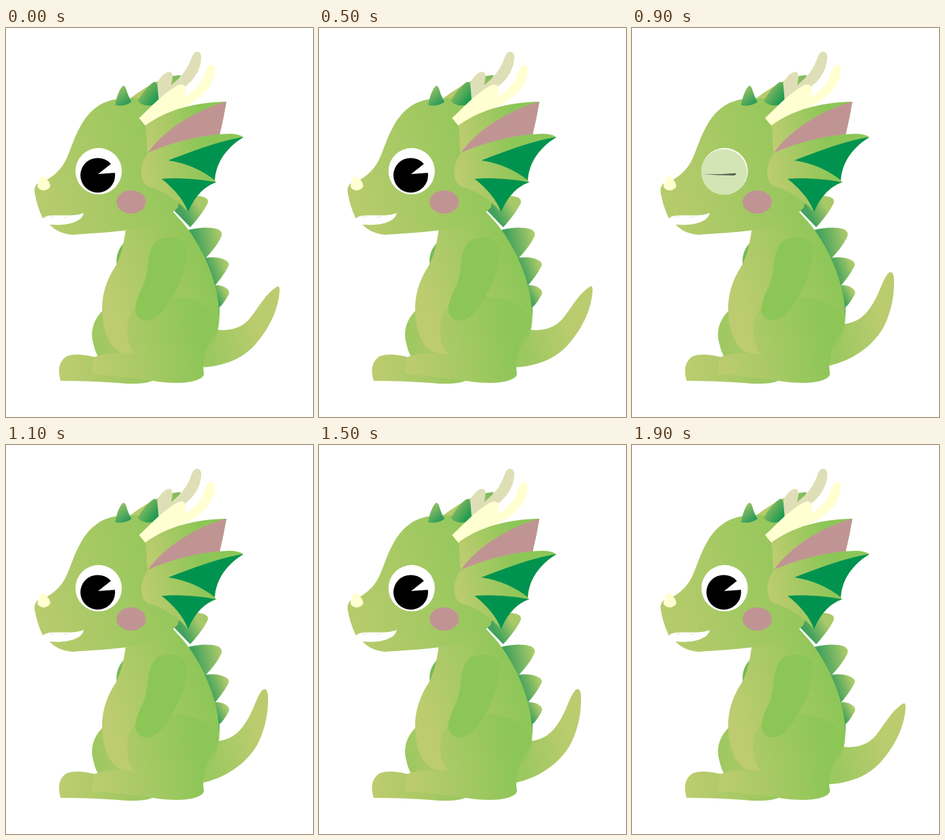
Animation of 450 by 570 pixels, one loop 2100 ms. Source, as an HTML page with a canvas:

```html
<!DOCTYPE html>
<html lang="en">
<head>
<meta charset="utf-8">
<title>Little dragon</title>
<style>
html, body { margin: 0; width: 100%; height: 100%; overflow: hidden; background: #fff; }
canvas { display: block; }
</style>
</head>
<body>
<canvas id="stage" width="450" height="570"></canvas>
<script>
const ctx = document.getElementById('stage').getContext('2d');
const LOOP = 2100;
const LIME = '#bdcc70', GREEN = '#8cc657', DARK = '#00934f';
const PINK = '#c19494', CREAM = '#ffffd2', SHADE = '#dfdfb7';

function blend(x0, y0, x1, y1, from = LIME, to = GREEN) {
  const g = ctx.createLinearGradient(x0, y0, x1, y1);
  g.addColorStop(0, from);
  g.addColorStop(1, to);
  return g;
}

function shape(fill, d) {
  ctx.fillStyle = fill;
  ctx.fill(new Path2D(d));
}

function ellipse(fill, x, y, rx, ry = rx) {
  ctx.fillStyle = fill;
  ctx.beginPath();
  ctx.ellipse(x, y, rx, ry, 0, 0, Math.PI * 2);
  ctx.fill();
}

const tails = {
  low: 'M295 442H308C332 445 349 438 361 421C371 408 381 389 397 379Q401 377 401 384C400 409 388 438 366 463C347 485 318 496 288 497Z',
  mid: 'M295 440H309C328 442 341 435 352 423C365 408 372 384 385 371Q389 369 389 377C387 405 381 429 366 451C350 475 318 492 288 497Z',
  high: 'M295 436L309 434C329 432 340 423 349 410C363 391 367 368 376 359C381 355 384 361 384 368C385 394 379 417 370 436C354 467 321 488 288 495Z'
};

function drawTail(pose) {
  shape(blend(293, 452, 370, 430, '#9cc860', '#bbcc6f'), tails[pose]);
}

function drawBackSpikes() {
  const spike = (x0, y0, x1, y1, d) =>
    shape(blend(x0, y0, x1, y1, '#43a25c', '#a9c969'), d);
  spike(258, 271, 282, 257,
    'M243 264C258 253 272 242 282 246Q300 248 295 258C289 270 279 282 270 292Z');
  spike(276, 309, 313, 301,
    'M267 296C282 292 299 291 311 295Q319 299 315 307C309 319 301 328 292 338Z');
  spike(297, 355, 322, 346,
    'M290 337C304 335 315 336 323 341Q329 345 325 351C319 362 312 371 304 380Z');
  spike(308, 395, 323, 387,
    'M303 377C313 376 320 378 325 383Q329 388 325 393C321 400 317 406 313 409V422H306Z');
}

function drawBody() {
  shape('#75b957', 'M174 314C164 323 160 336 163 351L175 345Z');
  shape(blend(126, 460, 165, 455, '#9dc860', '#a9c966'),
    'M145 411C128 426 123 444 128 462C130 472 133 479 138 486H190V430Z');
  shape(blend(80, 500, 215, 510, LIME, '#98c75d'),
    'M80 517C75 500 78 488 89 481C101 476 120 479 137 484L215 517C202 522 184 522 163 520C136 518 108 517 80 517Z');
  shape(blend(155, 405, 303, 360),
    'M176 292C173 314 169 333 161 348C146 371 140 393 141 416C142 444 151 469 170 476L205 480L297 468Q316 448 312 411C309 366 285 316 259 285L240 264Z');
  shape(blend(128, 495, 290, 466),
    'M126 507C126 497 127 490 130 482C148 475 168 476 190 478C178 467 175 444 180 426C186 406 207 395 237 394C273 391 304 408 311 431C310 443 304 449 296 462C293 476 287 491 290 505C292 514 274 520 250 520Q231 520 215 517Q167 510 126 507Z');
  shape(GREEN,
    'M224 310C245 304 266 307 265 330C264 358 250 387 232 412C218 430 202 434 192 421C185 410 195 391 202 375C211 355 204 323 224 310Z');
}

function drawHead() {
  shape(blend(215, 88, 258, 70, '#b6ca6b', '#75b957'),
    'M178 106C198 91 228 70 256 69L244 105Z');
  shape(SHADE,
    'M222 109C224 98 219 87 223 78C229 68 237 62 242 65C246 69 243 78 242 84C252 75 260 68 266 57C272 47 272 38 278 35C285 33 287 40 286 46C285 62 275 77 261 87L240 108Z');
  shape(blend(52, 225, 232, 178, '#b6cb6c', '#94c75b'),
    'M42 241Q41 232 46 228C57 225 69 218 78 208C92 193 94 172 108 146C121 121 140 106 166 104C193 101 219 103 241 112L267 181L252 263C235 281 202 294 171 297C146 300 120 301 98 303C84 302 72 297 64 288C86 290 111 286 114 271C100 277 76 273 63 275Q57 276 54 279C48 267 44 253 42 241Z');
  ctx.strokeStyle = '#ddddd2';
  ctx.lineWidth = 0.8;
  ctx.stroke(new Path2D('M63 276Q67 279 71 276M84 276Q88 280 92 275'));
  shape(CREAM, 'M46 232Q49 217 54 217Q59 218 60 222Q64 225 65 232Q62 238 54 238Q48 237 46 232Z');
  shape(blend(163, 93, 178, 113, '#8dbd62', '#249859'),
    'M160 113C162 101 166 90 171 85Q174 84 176 89Q179 100 184 108C178 113 169 115 160 113Z');
  shape(blend(200, 90, 224, 107, '#86b960', '#0c954f'),
    'M193 107C199 96 208 84 217 79Q221 78 222 85L224 109C215 115 202 116 193 107Z');
}

function drawFrill() {
  shape(CREAM,
    'M195 132C211 117 230 96 250 85C259 80 264 84 264 92L262 101C274 93 284 85 289 72C292 63 295 54 302 54C307 55 307 66 304 74C298 91 285 102 270 111L205 144Z');
  shape(blend(204, 157, 287, 122),
    'M204 143C237 119 277 109 323 108Q319 132 313 157L208 183C204 169 208 155 204 143Z');
  shape(PINK, 'M323 108C285 118 235 145 208 183C239 169 274 160 313 157Q319 132 323 108Z');
  shape(blend(198, 205, 291, 185),
    'M208 183C245 167 287 156 327 155Q341 155 348 160C325 174 308 195 306 223L308 226C288 233 275 250 267 270C253 253 230 238 211 233C195 228 194 202 208 183Z');
  shape(DARK, 'M348 160C318 164 280 178 238 194Q277 200 306 223C308 195 325 174 348 160Z');
  shape(DARK, 'M228 221C251 219 282 221 308 226C288 233 275 250 267 270C260 251 246 235 228 221Z');
}

function drawFace(closed) {
  ellipse(PINK, 183.5, 255, 21.5, 17);
  ellipse('#fff', 135.8, 209.8, 34);
  if (closed) {
    ellipse('#d3e5b4', 135, 211, 33.5);
    shape('#596952', 'M101 214Q126 215 147 213Q153 212 153 214Q151 217 145 216Q124 216 101 214Z');
  } else {
    ellipse('#000', 134.5, 215.8, 25.4);
    shape('#fff', 'M135 214L154 199Q161 204 162 212Z');
  }
}

const between = (t, a, b) => t >= a && t < b;

function tailPose(t) {
  if (between(t, 200, 400) || between(t, 900, 1800)) return 'high';
  if (between(t, 100, 500) || between(t, 800, 1900)) return 'mid';
  return 'low';
}

const eyeClosed = t =>
  between(t, 200, 400) || between(t, 900, 1100) || between(t, 1300, 1500);

const start = performance.now();

function render(now) {
  const t = Math.max(0, now - start) % LOOP;
  ctx.fillStyle = '#fff';
  ctx.fillRect(0, 0, 450, 570);
  drawTail(tailPose(t));
  drawBackSpikes();
  drawBody();
  drawHead();
  drawFrill();
  drawFace(eyeClosed(t));
  requestAnimationFrame(render);
}

render(start);
</script>
</body>
</html>
```
